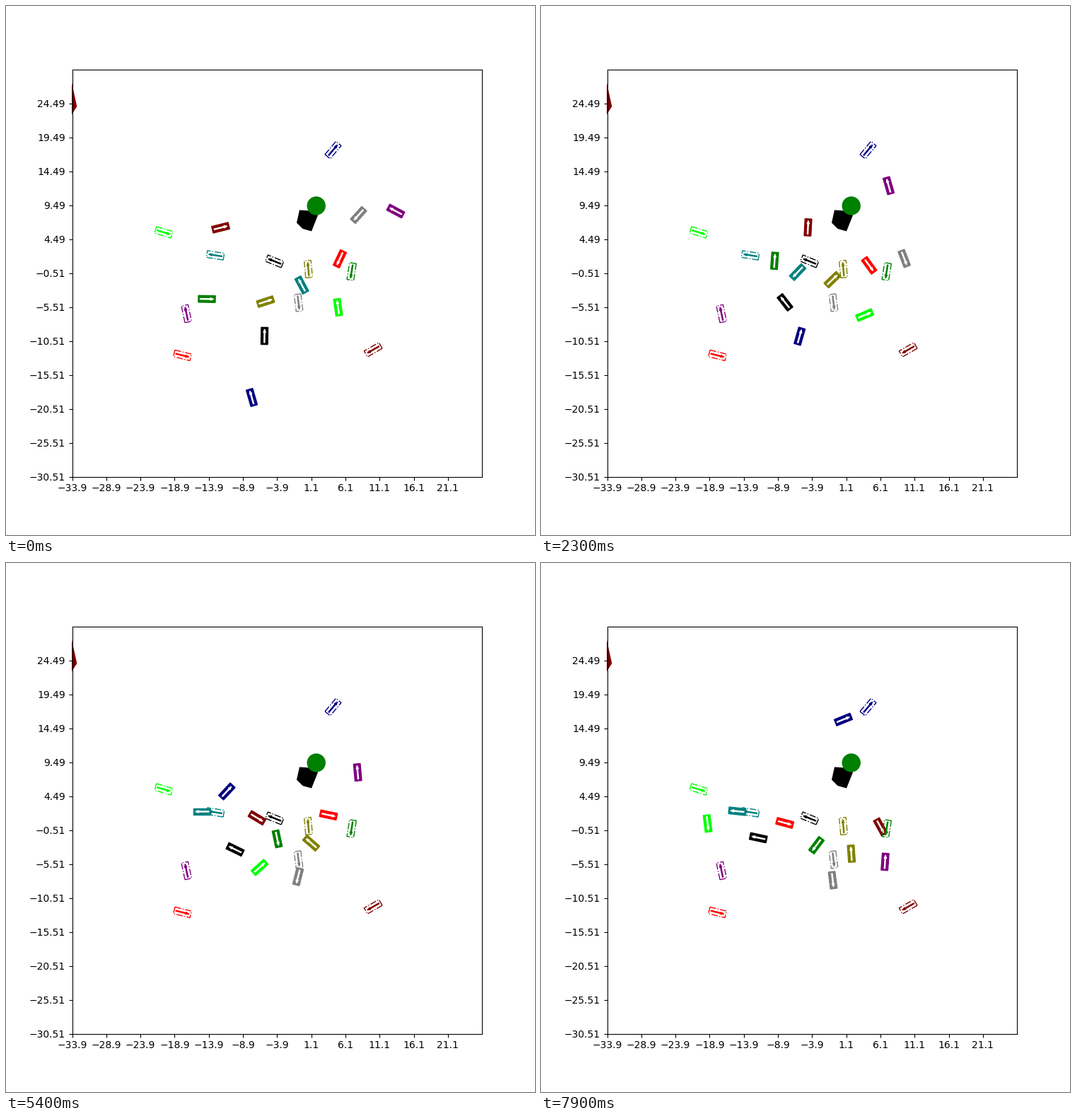
Animation, 748 px wide and 748 px high, one loop 8 s. Source, as a matplotlib script:

```python
import numpy as np
import matplotlib.pyplot as plt
from matplotlib.animation import FuncAnimation
from matplotlib.patches import Circle, FancyArrow, Polygon, Rectangle
from matplotlib.transforms import Affine2D

SIZE = 748
FRAMES = 80
KNOTS = (0, 7, 22, 43, 53, 68, 78)
LENGTH, WIDTH = 24.1, 9.6

fig = plt.figure(figsize=(SIZE / 100, SIZE / 100), dpi=100, facecolor="white")

# Pixel-space layer for the shapes, with the plot frame on top
stage = fig.add_axes([0, 0, 1, 1], zorder=0)
stage.set(xlim=(0, SIZE), ylim=(SIZE, 0))
stage.axis("off")

ax = fig.add_subplot(111, zorder=1, facecolor="none")
ax.set(xlim=(-33.9, 26.1), ylim=(-30.51, 29.49))
ax.set_xticks(-33.9 + 5 * np.arange(12))
ax.set_yticks(-30.51 + 5 * np.arange(12))
ax.xaxis.set_major_formatter(lambda v, _: f"{v:.1f}".replace("-", "\u2212"))
ax.yaxis.set_major_formatter(lambda v, _: f"{v:.2f}".replace("-", "\u2212"))


def direction(deg):
    a = np.radians(deg)
    return np.stack([np.cos(a), -np.sin(a)], axis=-1)


def steer(a, b, chord, h):
    """Heading profile from a to b that bends towards the chord."""
    dist = np.hypot(*chord)
    aim = np.degrees(np.arctan2(-chord[1], chord[0]))
    miss = (aim - (a + b) / 2 + 90) % 180 - 90
    bend = np.clip(1.5 * miss, -70, 70) * min(1, dist / 25)
    return lambda s: a + (b - a) * s + bend * 4 * s * (1 - s)


def drive(keys):
    """Unicycle path through {step: (x, y, heading)}; one row per step."""
    steps = sorted(keys)
    pose = np.array([keys[t] for t in steps], float)
    gaps = np.diff(steps)
    chords = np.diff(pose[:, :2], axis=0)

    turns, pace = [], []
    for i, h in enumerate(gaps):
        turn = steer(pose[i, 2], pose[i + 1, 2], chords[i], h)
        reach = direction(turn((np.arange(h) + 0.5) / h)).sum(axis=0)
        turns.append(turn)
        pace.append(chords[i] @ reach / max(reach @ reach, 1) if h == 0
                    else (chords[i] @ reach) / max(reach @ reach, h))

    speed = [0.0]
    for i in range(1, len(gaps)):
        h0, h1 = gaps[i - 1], gaps[i]
        speed.append((pace[i - 1] * h1 + pace[i] * h0) / (h0 + h1))
    speed.append(pace[-1])

    rows = [pose[:1]]
    for i, h in enumerate(gaps):
        v0, v1 = speed[i], speed[i + 1]
        s = (np.arange(h) + 0.5) / h
        v = v0 + (v1 - v0) * s + 6 * (pace[i] - (v0 + v1) / 2) * s * (1 - s)
        move = v[:, None] * direction(turns[i](s))
        move += (chords[i] - move.sum(axis=0)) / h
        spot = pose[i, :2] + np.cumsum(move, axis=0)
        rows.append(np.column_stack([spot, turns[i](np.arange(1, h + 1) / h)]))
    return np.vstack(rows)


def place(parts, x, y, heading):
    tr = Affine2D().rotate_deg(-heading).translate(x, y) + stage.transData
    for part in parts:
        part.set_transform(tr)


def box(color, arrow, **style):
    parts = [
        Rectangle((-LENGTH / 2, -WIDTH / 2), LENGTH, WIDTH, edgecolor=color, lw=1, **style),
        FancyArrow(-9.5, 0, 19, 0, width=1.1, head_width=3.2, head_length=4.6,
                   length_includes_head=True, color=arrow, lw=1),
    ]
    for part in parts:
        stage.add_patch(part)
    return parts


cars = []


def add_car(color, goal, *poses, extra=None):
    place(box(color, color, fill=False, linestyle="-."), *goal)
    keys = dict(zip(KNOTS, poses)) | (extra or {})
    cars.append((box(color, "white", facecolor=color), drive(keys)))


# Obstacles
rock = Polygon([(85, 72), (100.3, 142), (85, 166)], color="maroon", lw=0)
stage.add_patch(rock)
rock.set_clip_path(Rectangle((93.5, 89.8), 579.7, 576, transform=stage.transData))
stage.add_patch(Polygon([(415, 288.5), (436, 290), (441, 296), (432, 318.5),
                         (419.5, 315), (411, 306.5)], color="black", lw=0))
stage.add_patch(Circle((438.7, 282.5), 13.2, color="green", lw=0))

# Each car: goal pose, then poses at the knots (x, y, heading in degrees)
add_car("black", (379.7, 361, 158),
        (365.5, 466.5, 89), (364.5, 458.5, 106), (345, 419, 128),
        (325.5, 406, 167), (324, 405, 154), (300, 386.5, 159), (307.3, 388.5, 168))
add_car("gray", (413.6, 419.5, -83),
        (498.5, 295.5, 228), (493.5, 305, 257), (513.6, 357, 291),
        (433.5, 424, 214), (413, 443.5, 256), (413, 455, 277), (412.5, 448.5, 277))
add_car("red", (249.5, 494, -14),
        (472, 357.5, 245), (468.3, 367, 255), (464, 366.7, 306),
        (457, 356, 341), (456, 356.3, 348), (404.2, 349, 360), (344.7, 367.5, 345))
add_car("maroon", (519.2, 486, 210),
        (303.5, 313.5, 14), (314, 313.3, -14), (377.5, 313, 87),
        (333.5, 335, 295), (355, 360.3, 329), (420.5, 372.5, 351), (480, 373, 299))
add_car("olive", (427.5, 372, 95),
        (367, 418, 18), (375.5, 413.3, 36), (412, 387, 44),
        (421, 376.5, 101), (431.5, 396, 139), (435.8, 401, 119), (438.8, 411, 94))
add_car("lime", (223, 320, -17),
        (469.5, 426, 98), (468.2, 418.5, 101), (457.7, 437, 23),
        (379, 382.5, 26), (358.6, 430.5, 42), (269, 423, -40), (235.6, 368.3, -83))
add_car("green", (488.7, 375.5, 261),
        (284, 414.3, -1), (294.5, 414, 6), (330.3, 360.3, 86),
        (386, 353.5, -122), (383.5, 390, -78), (381.2, 421.5, -99), (389.5, 399, -127))
add_car("teal", (296, 352.5, 171),
        (418.2, 394.5, 118), (412.5, 385.5, 114), (363, 376.3, 226),
        (291.5, 351, 172), (277.3, 351.5, 180), (279.7, 351.3, 177), (277.5, 351, 174))
add_car("navy", (462.5, 203.7, 50),
        (347.5, 553.5, 106), (347, 543, 79), (365.7, 467, 74),
        (342, 360.3, 174), (312.3, 323, 47), (375.6, 260, 47), (427.5, 221.3, 22))
add_car("purple", (255.2, 435, 102),
        (551, 290, 152), (541, 286, 161), (491.5, 254, 106),
        (485.2, 250.3, 90), (497.2, 296, 95), (465.5, 370, 83), (486.5, 422.5, 86),
        extra={27: (488, 236.5, 99), 36: (486, 233.5, 93)})


def draw(frame):
    step = max(0, frame - 1)
    for parts, path in cars:
        place(parts, *path[step])


anim = FuncAnimation(fig, draw, frames=FRAMES, interval=100, repeat=True,
                     repeat_delay=0, blit=False, init_func=lambda: draw(0))
plt.show()
```
